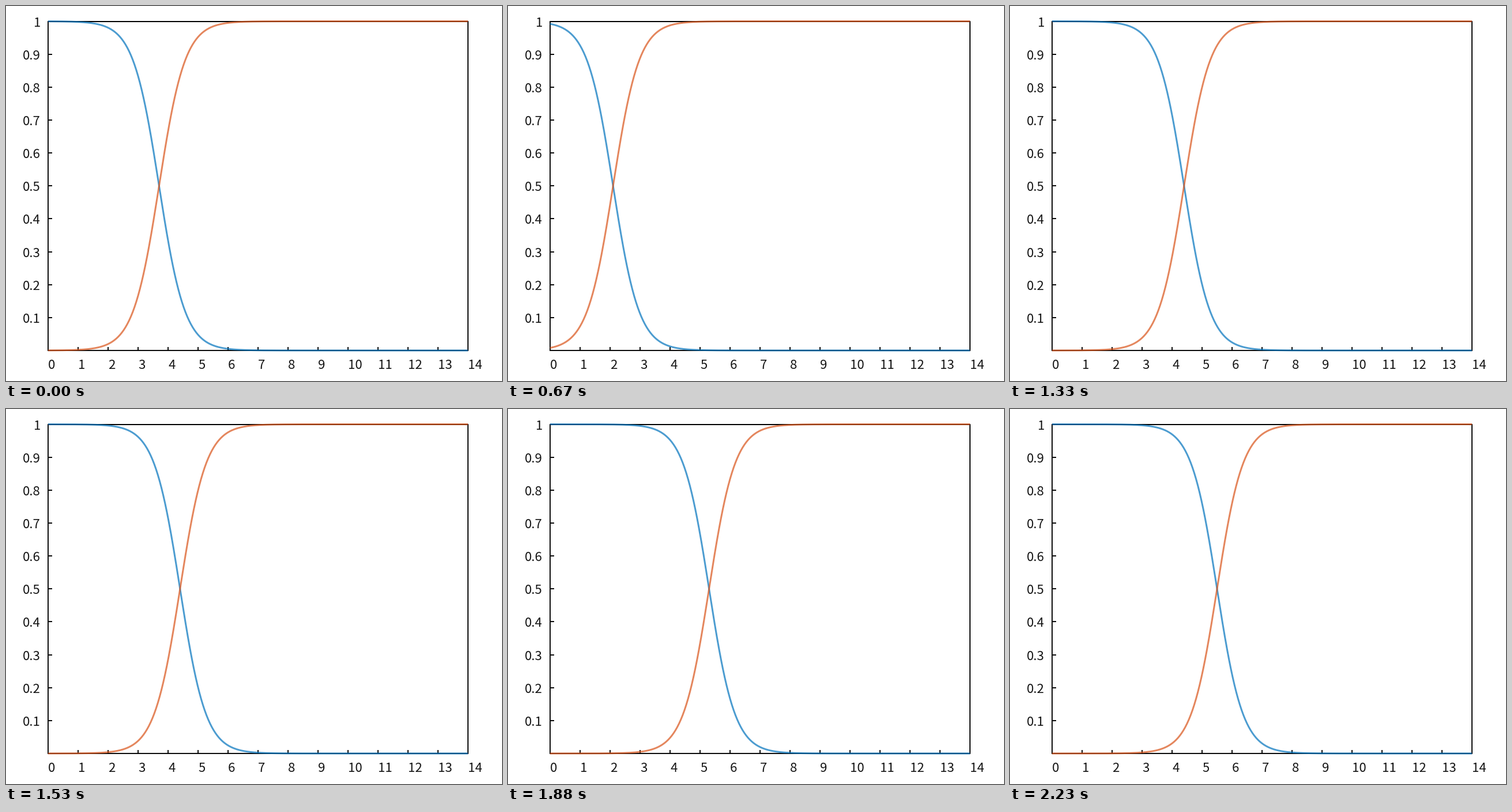
Recreate the animation shown at these times as a matplotlib script. Size 860 by 651 pixels, loop 2.37 s.

```python
import numpy as np
import matplotlib.pyplot as plt
from matplotlib.animation import FuncAnimation

W, H, DPI = 860, 651, 100
PX = 72 / DPI                       # points per pixel
LEFT, RIGHT, TOP, BOTTOM = 73, 801, 26.5, 598
STEP = 10                           # ms per tick
LOOP = 2370

# midpoint of the crossover and the time (ms) at which it takes effect
MIDPOINTS = [3.7, 2.7, 2.1, 3.3, 4.4, 5.3, 5.5]
STARTS = [0, 330, 670, 1000, 1330, 1670, 2020]

plt.rcParams["font.family"] = ["Noto Sans CJK JP", "DejaVu Sans"]

fig = plt.figure(figsize=(W / DPI, H / DPI), dpi=DPI, facecolor="white")
ax = fig.add_axes([0, 0, 1, 1])
ax.set_xlim(0, W)
ax.set_ylim(H, 0)
ax.axis("off")


def px(x):
    return LEFT + (RIGHT - LEFT) * x / 14


def py(y):
    return BOTTOM + (TOP - BOTTOM) * y


def rule(xs, ys):
    ax.plot(xs, ys, color="black", lw=1.9 * PX, solid_capstyle="butt",
            solid_joinstyle="miter", zorder=1)


def label(x, y, text):
    ax.text(x, y, text, fontsize=22.2 * PX, color="#141414",
            ha="left", va="baseline")


def curve(color):
    return ax.plot([], [], color=color, alpha=0.7, lw=3 * PX,
                   solid_capstyle="butt", solid_joinstyle="round", zorder=3)[0]


rule([LEFT, RIGHT, RIGHT, LEFT, LEFT, RIGHT],
     [TOP, TOP, BOTTOM, BOTTOM, TOP, TOP])

for i in range(15):
    if 0 < i < 14:
        rule([px(i)] * 2, [BOTTOM, BOTTOM - 6.5])
    label(px(i), 630, str(i))

for i in range(1, 11):
    y = py(i / 10)
    if i < 10:
        rule([LEFT, LEFT + 6.5], [y, y])
    label(29 if i < 10 else 48, y + 9, f"{i / 10:g}")

x = np.linspace(0, 14, 701)
falling = curve("#0072BD")
rising = curve("#D95319")
for line in (falling, rising):
    line.set_xdata(px(x))


def update(n):
    mid = MIDPOINTS[np.searchsorted(STARTS, n * STEP, side="right") - 1]
    share = 1 / (1 + 10 ** (mid - x))
    rising.set_data(px(x), py(share))
    falling.set_data(px(x), py(1 - share))
    return falling, rising


anim = FuncAnimation(fig, update, frames=LOOP // STEP, interval=STEP,
                     repeat=True, repeat_delay=0, blit=False)
plt.show()
```
